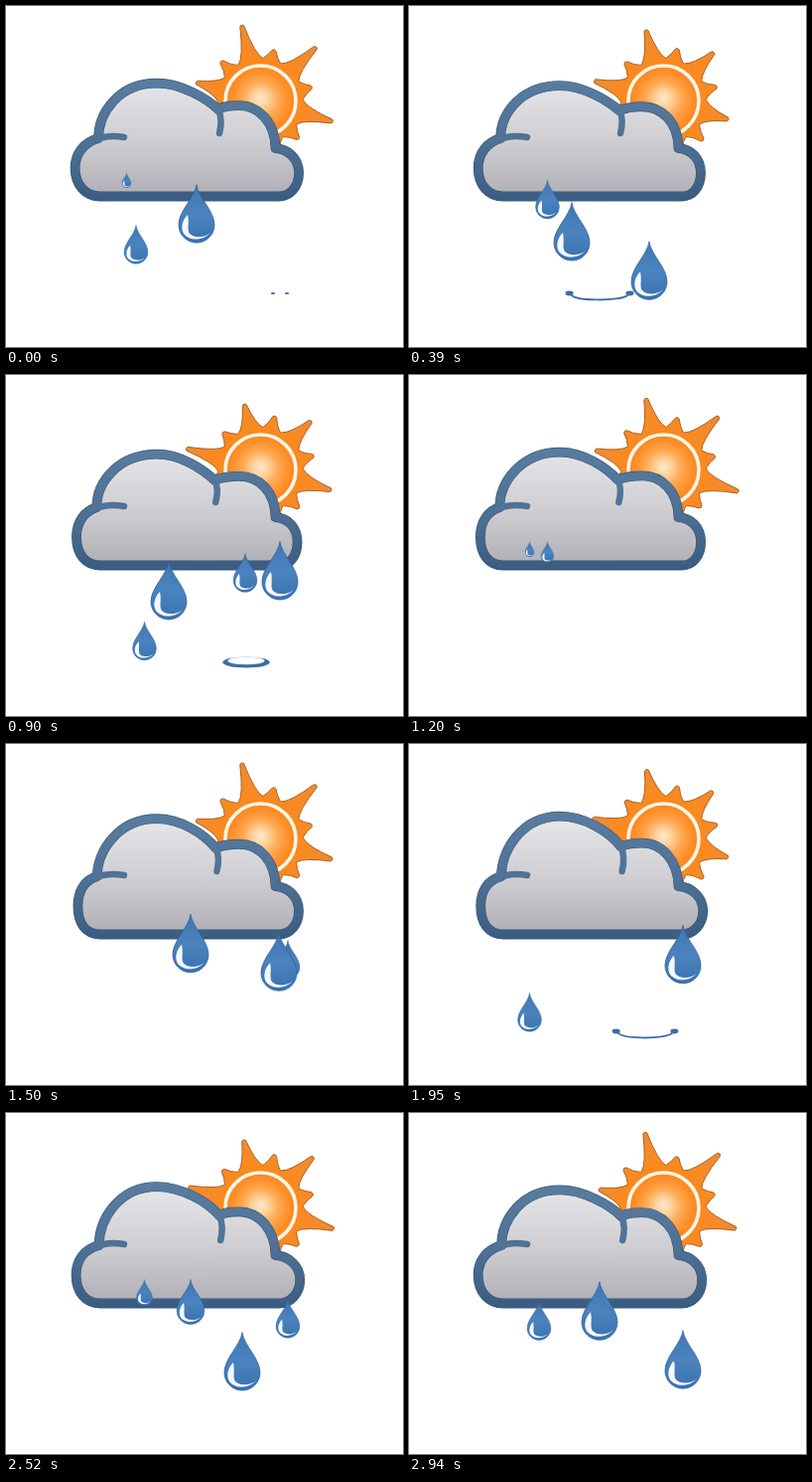
An HTML page with a canvas for the animation above (2.97 s loop, 400 by 343 pixels).

```html
<!DOCTYPE html>
<html lang="en">
<head>
<meta charset="utf-8">
<title>Sun, cloud and rain</title>
<style>
html, body { margin: 0; width: 100%; height: 100%; overflow: hidden; background: #fff; }
canvas { display: block; }
</style>
</head>
<body>
<canvas id="stage" width="400" height="343"></canvas>
<script>
const ctx = document.getElementById('stage').getContext('2d');
const STEP = 30, STEPS = 99, LOOP = STEP * STEPS;
const TOP = 170, FLOOR = 298, GRAVITY = 7;
const GROW = 2.6, SPLASH = 4.6;
const BIG = 1, SMALL = 0.66;

// Each lane lets drops go at a steady interval, counted in steps.
const drops = [];
function lane(size, x, first, gap = 0, count = 1) {
  for (let i = 0; i < count; i++) drops.push({ x, size, release: first + i * gap });
}
lane(SMALL, 121.5, 1.6, 20, 4);
lane(SMALL, 131, 96.3);
lane(SMALL, 139.5, 12.1, 14.55, 6);
lane(SMALL, 241, 28.8);
lane(SMALL, 284, 48, 34.4, 2);
lane(BIG, 164, 11, 17.4, 2);
lane(BIG, 186, 49.5, 35.1, 2);
lane(BIG, 192, 97.8, 8, 2);
lane(BIG, 238, 59, 22.3, 2);
lane(BIG, 242, 9.9, 14.9, 2);
lane(BIG, 276, 95.35, 33.65, 3);
lane(BIG, 275, 48.3);

const wave = (t, period, peak) => Math.cos(2 * Math.PI * (t - peak) / period);

function shade(gradient, colors) {
  colors.forEach((color, i) => gradient.addColorStop(i / (colors.length - 1), color));
  return gradient;
}
const vertical = (y0, y1, ...colors) => shade(ctx.createLinearGradient(0, y0, 0, y1), colors);
const radial = (r0, r1, ...colors) => shade(ctx.createRadialGradient(0, -3, r0, 0, 0, r1), colors);

function polar(r, deg) {
  const a = deg * Math.PI / 180;
  return [r * Math.cos(a), r * Math.sin(a)];
}

function spike(angle, length, half) {
  const tip = 115 / length;
  ctx.lineTo(...polar(43, angle - half));
  ctx.quadraticCurveTo(...polar(47, angle - half * 0.45), ...polar(length - 1, angle - tip));
  ctx.quadraticCurveTo(...polar(length + 1, angle), ...polar(length - 1, angle + tip));
  ctx.quadraticCurveTo(...polar(47, angle + half * 0.45), ...polar(43, angle + half));
}

function drawSun(t) {
  ctx.save();
  ctx.translate(256.5, 95.5);
  ctx.beginPath();
  // The stretch of the rays travels around the sun.
  for (let i = 0; i < 6; i++) {
    const stretch = wave(t, LOOP / 2, 40 - 150 * i);
    spike(60 * i - 104, 73.3 + 5.5 * stretch, 17);
    spike(60 * i - 75, 55 - 1.5 * stretch, 12);
  }
  ctx.closePath();
  ctx.fillStyle = radial(34, 76, '#fb8a1c', '#f68a28', '#ee8a35');
  ctx.fill();
  ctx.strokeStyle = '#a8601f';
  ctx.lineWidth = 1;
  ctx.stroke();
  ctx.beginPath();
  ctx.arc(0, 0, 35.5, 0, 7);
  ctx.fillStyle = radial(0, 35, '#ffe9cf', '#ffcf98', '#ffab55', '#ff9433', '#fd8518');
  ctx.fill();
  ctx.strokeStyle = '#fff6ea';
  ctx.lineWidth = 3.6;
  ctx.stroke();
  ctx.restore();
}

function drawCloud(t) {
  const left = 71 + 1.5 * wave(t, LOOP, 1650);
  const top = 76.5 + 4 * wave(t, LOOP, 600);
  const right = 295 + 1.5 * wave(t, LOOP, 2250);
  const fold = 213.7 + 2.5 * wave(t, LOOP, 2500);
  const side = 92.5 + 1.2 * wave(t, LOOP, 2500);
  const shoulder = 100.5 + 1.3 * wave(t, LOOP, 850);
  const crease = `${fold - 1} ${shoulder + 4}`;

  const body = new Path2D(`M95 191.5 C80 191.5 ${left} 180 ${left} 163
    C${left} 148 79 137 ${side} 133 C${side} 108 113 ${top} 152 ${top}
    C176 ${top} ${fold - 13} ${top + 15} ${crease}
    C220 ${shoulder} 228 ${shoulder} 235 ${shoulder} C254 ${shoulder} 271 116 271.5 143
    C284 144 ${right} 153 ${right} 168 C${right} 182 286 191.5 275 191.5 Z`);
  const folds = new Path2D(`M${crease} C${fold + 2} 111 ${fold + 2} 120 ${fold} 128
    M${side - 3} 135 C99 130.5 110 130.5 119 132`);

  ctx.lineJoin = ctx.lineCap = 'round';
  ctx.fillStyle = vertical(78, 190, '#e5e5e8', '#cfcfd3', '#afafb5');
  ctx.fill(body);
  ctx.strokeStyle = '#365677';
  ctx.lineWidth = 9.8;
  ctx.stroke(body);
  ctx.strokeStyle = vertical(75, 196, '#587c9f', '#4e7195', '#3b5c82');
  ctx.lineWidth = 8.6;
  ctx.stroke(body);
  ctx.lineWidth = 6.5;
  ctx.stroke(folds);
}

const dropShape = new Path2D('M0 0 C2 13 18 26 18 40 A18 18 0 0 1 -18 40 C-18 26 -2 13 0 0 Z');
const shine = new Path2D(`M-9 30 C-15 36 -16 44 -13 49 C-8 56 6 57 14 48
  C7 54 -3 53 -7 49 C-10 45 -7 38 -9 30 Z`);

function drawDrop(x, y, size) {
  ctx.save();
  ctx.translate(x, y);
  ctx.scale(size, size);
  ctx.fillStyle = vertical(0, 58, '#3f77b3', '#4a83bd', '#3a72b0');
  ctx.fill(dropShape);
  ctx.strokeStyle = '#2f639e';
  ctx.lineWidth = 0.8;
  ctx.stroke(dropShape);
  ctx.fillStyle = '#f4f9ff';
  ctx.fill(shine);
  ctx.restore();
}

// Two specks open into a ring, then an arc, then specks again.
function drawSplash(x, y, age, size) {
  const half = 34 * (1 - (1 - age / 4.5) ** 2) * size;
  ctx.fillStyle = ctx.strokeStyle = '#3c6ea6';
  const blobs = (w, h) => [-1, 1].forEach(s => {
    ctx.beginPath();
    ctx.ellipse(x + s * half, y, w, h, 0, 0, 7);
    ctx.fill();
  });
  if (age < 1) {
    blobs(2.2, 1);
  } else if (age < 2.8) {
    ctx.beginPath();
    ctx.ellipse(x, y, half, 5.5 * size, 0, 0, 7);
    ctx.ellipse(x, y - 1.5, half * 0.78, 3.8 * size, 0, 0, 7);
    ctx.fill('evenodd');
  } else if (age < 4) {
    ctx.beginPath();
    ctx.ellipse(x, y + 1, half - 2, 5.5 * size, 0, 0.15, Math.PI - 0.15);
    ctx.lineWidth = 1.8;
    ctx.stroke();
    blobs(4 * size, 2.4 * size);
  } else {
    blobs(1.6, 2);
  }
}

function drawRain(step) {
  for (const { x, size, release } of drops) {
    // Steps since release, wrapped so that growth before it is negative.
    const n = (step - release + 3 * STEPS + GROW) % STEPS - GROW;
    const land = Math.sqrt((FLOOR - 58 * size - TOP) / GRAVITY);
    if (n < 0) drawDrop(x, TOP - 2, size * (n + GROW) / GROW);
    else if (n <= land) drawDrop(x, TOP + GRAVITY * n * n, size);
    else if (n <= land + SPLASH) drawSplash(x, FLOOR - 9, Math.min(n - land, 4.5), size);
  }
}

const start = performance.now();
function draw(now) {
  const step = Math.floor(Math.max(0, now - start) / STEP) % STEPS;
  ctx.clearRect(0, 0, 400, 343);
  drawSun(step * STEP);
  drawCloud(step * STEP);
  drawRain(step);
  requestAnimationFrame(draw);
}
draw(start);
</script>
</body>
</html>
```
